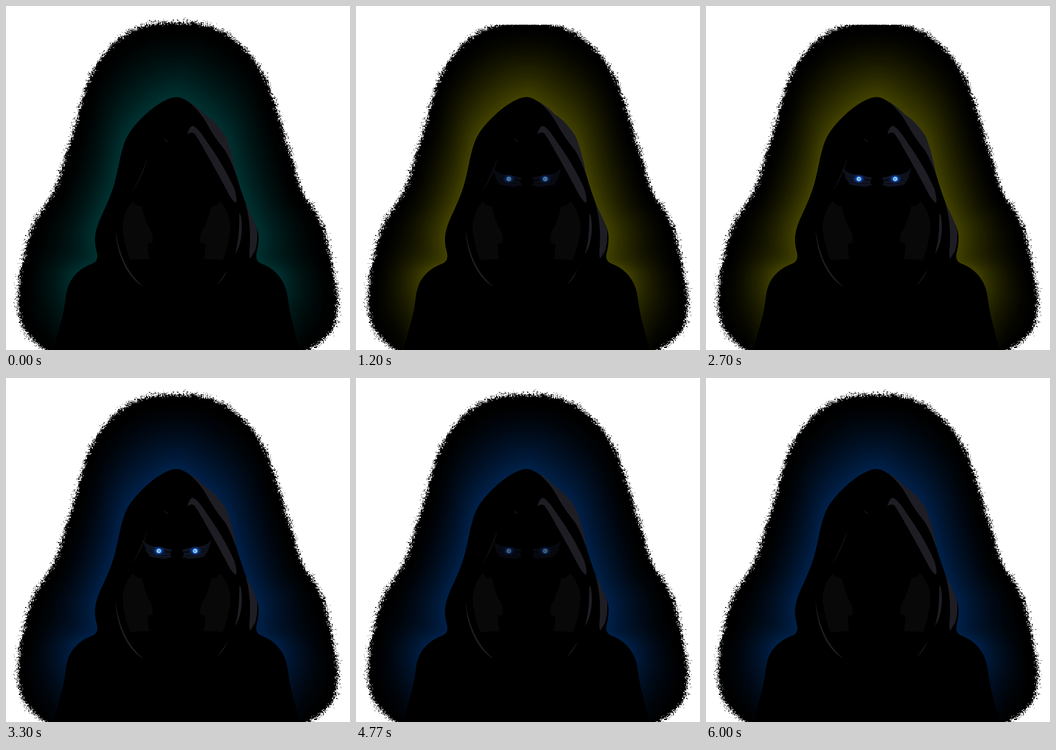
An HTML page with a canvas that plays this animation: 700x700 px, repeating every 6270 ms.

```html
<!DOCTYPE html>
<html lang="en">
<head>
<meta charset="utf-8">
<title>Hooded figure</title>
<style>
  html, body { margin: 0; width: 100%; height: 100%; overflow: hidden; background: #fff; }
  canvas { display: block; }
</style>
</head>
<body>
<canvas id="stage" width="700" height="700"></canvas>
<script>
const SIZE = 700, LOOP = 6270, BEAT = 300;
const stage = document.getElementById('stage').getContext('2d');

// Glow colour at the figure's edge, and the height at which the aura is cut off
const auras = [
  { rgb: [0, 49, 49], top: 0 },
  { rgb: [0, 33, 74], top: 0 },
  { rgb: [68, 0, 0], top: 0 },
  { rgb: [74, 74, 74], top: 52 },
  { rgb: [66, 66, 0], top: 38 }
];

// Both outlines run from bottom left to bottom right with paired points
const figure = points(`96,700 110,650 119,615 124,572 139,547 160,530 190,519 179,480 185,447 200,415
  217,375 226,340 234,300 244,268 262,242 290,214 318,194 345,183 366,190 400,217 427,240 448,270
  460,310 470,350 486,398 500,430 514,457 514,487 506,519 535,530 556,548 571,575 576,615 584,650 598,700`);
const aura = points(`85,701 55,683 31,652 23,600 29,545 36,510 46,470 66,425 93,390 105,360
  122,305 138,255 154,195 171,140 200,95 240,57 290,35 345,33 400,35 450,55 498,97 530,148
  551,210 569,272 587,330 602,384 628,415 645,447 656,490 665,530 671,565 676,605 670,652 645,683 612,701`);

const cloth = new Path2D(`
  M370 193Q390 205 405 221Q425 232 447 265Q460 297 469 346Q458 314 446 294Q424 268 408 238Q394 213 370 193Z
  M369 261Q374 243 381 244Q391 248 410 278Q445 327 465 373Q471 396 468 400Q464 400 455 386Q432 342 405 295Q390 268 383 259Q376 255 369 261Z
  M487 402Q500 424 511 454Q513 476 507 498L497 514Q494 510 496 490Q499 440 487 402Z
  M475 422Q480 425 480 455Q478 488 466 504Q473 480 474 455Z
  M223 453C228 498 244 542 280 571C250 556 225 510 223 453Z`);
const slivers = new Path2D(`
  M288 309Q279 346 255 380Q274 350 288 309Z
  M451 536Q443 556 429 568Q440 553 451 536Z
  M322 268Q325 274 331 276Q323 277 322 268Z`);
const cheek = new Path2D(`M258 397Q263 407 277 408Q280 432 297 462Q300 475 298 482L288 484
  Q289 505 292 515L253 517Q241 490 237 450Q238 420 258 397Z`);
const lid = new Path2D(`M279 331Q290 342 318 345L338 350L334 358L337 364L329 367L310 366L294 363Q284 354 279 331Z`);
const creases = new Path2D(`M279 331Q286 344 302 345T337 350M280 338Q288 348 300 347M283 346Q290 352 301 351
  M287 354Q297 363 312 363T337 364M284 350Q296 359 312 359T334 357M290 361Q302 366 328 367
  M321 348Q329 352 335 351M322 355Q328 361 335 360`);

function points(text) {
  return text.trim().split(/\s+/).map(p => p.split(',').map(Number));
}

function layer() {
  const canvas = document.createElement('canvas');
  canvas.width = canvas.height = SIZE;
  return canvas.getContext('2d');
}

function fillOutline(c, pts, colour) {
  const last = pts.length - 1;
  c.beginPath();
  c.moveTo(pts[0][0], 760);
  c.lineTo(...pts[0]);
  for (let i = 1; i < last; i++) {
    const [x, y] = pts[i], [u, v] = pts[i + 1];
    c.quadraticCurveTo(x, y, (x + u) / 2, (y + v) / 2);
  }
  c.lineTo(...pts[last]);
  c.lineTo(pts[last][0], 760);
  c.fillStyle = colour;
  c.fill();
}

// Draws the left half's part twice, reflected about a vertical axis
function mirrored(c, axis, draw) {
  draw();
  c.save();
  c.translate(2 * axis, 0);
  c.scale(-1, 1);
  draw();
  c.restore();
}

// Soft aura shape broken into hard specks along its rim
function speckledMask() {
  const c = layer();
  c.filter = 'blur(7px)';
  fillOutline(c, aura, '#000');
  const image = c.getImageData(0, 0, SIZE, SIZE), px = image.data;
  let seed = 7;
  const random = () => (seed = (seed * 1664525 + 1013904223) >>> 0) / 2 ** 32;
  const cols = 234, clumps = Array.from({ length: cols * cols }, random);
  for (let y = 0, i = 3; y < SIZE; y++) {
    for (let x = 0; x < SIZE; x++, i += 4) {
      const clump = clumps[(y / 3 | 0) * cols + (x / 3 | 0)];
      px[i] = px[i] / 255 > 0.02 + 0.42 * clump + 0.45 * random() ? 255 : 0;
    }
  }
  c.putImageData(image, 0, 0);
  return c.canvas;
}

function drawScene({ rgb, top }, mask) {
  const c = layer(), steps = 70;
  c.fillRect(0, 0, SIZE, SIZE);
  for (let s = steps; s >= 0; s--) {
    const t = s / steps, glow = Math.max(0, 1 - t / 0.92) ** 1.4;
    const ring = figure.map(([x, y], i) => [x + (aura[i][0] - x) * t, y + (aura[i][1] - y) * t]);
    fillOutline(c, ring, `rgb(${rgb.map(v => v * glow)})`);
  }
  const fade = c.createLinearGradient(0, 540, 0, 690);
  fade.addColorStop(0, 'rgba(0,0,0,0)');
  fade.addColorStop(1, 'rgba(0,0,0,.9)');
  c.fillStyle = fade;
  c.fillRect(0, 540, SIZE, 160);

  fillOutline(c, figure, '#000');
  c.fillStyle = '#1e1d24';
  c.fill(cloth);
  c.fillStyle = '#19181e';
  c.fill(slivers);
  c.fillStyle = '#080808';
  mirrored(c, 347, () => c.fill(cheek));

  c.globalCompositeOperation = 'destination-in';
  c.drawImage(mask, 0, 0);
  c.clearRect(0, 0, SIZE, top);
  return c.canvas;
}

function drawEyes() {
  const c = layer();
  const disc = (x, y, r, colour) => {
    c.beginPath();
    c.arc(x, y, r, 0, 7);
    c.fillStyle = colour;
    c.fill();
  };
  const halo = c.createRadialGradient(311, 352, 3, 311, 352, 14);
  halo.addColorStop(0, '#1c62d8');
  halo.addColorStop(0.4, 'rgba(18,58,150,.85)');
  halo.addColorStop(1, 'rgba(10,25,70,0)');
  mirrored(c, 348, () => {
    c.fillStyle = '#090c15';
    c.fill(lid);
    c.strokeStyle = '#1c2337';
    c.lineWidth = 1;
    c.stroke(creases);
    c.save();
    c.scale(1, 0.75);
    c.translate(0, 117);
    disc(311, 352, 14, halo);
    c.restore();
    disc(311, 352, 5, '#55a8fa');
    disc(311, 352, 3.2, '#a9dcff');
    disc(311.5, 352, 1.3, '#17406f');
  });
  return c.canvas;
}

const mask = speckledMask();
const scenes = auras.map(a => drawScene(a, mask));
const eyes = drawEyes();
const clamp = v => Math.min(1, Math.max(0, v));

function render(now) {
  const t = now % LOOP, beat = Math.floor(t / BEAT);
  // The colour cycle skips one step after beat 13
  const scene = scenes[(beat + (beat > 13)) % 5];
  const tick = Math.floor(t / 30) * 30;
  stage.globalAlpha = 1;
  stage.fillStyle = '#fff';
  stage.fillRect(0, 0, SIZE, SIZE);
  stage.drawImage(scene, 0, 0);
  stage.globalAlpha = Math.min(clamp((tick - 210) / 1650), clamp((5970 - tick) / 2520));
  stage.drawImage(eyes, 0, 0);
  requestAnimationFrame(() => render(performance.now() - start));
}

const start = performance.now();
render(0);
</script>
</body>
</html>
```
